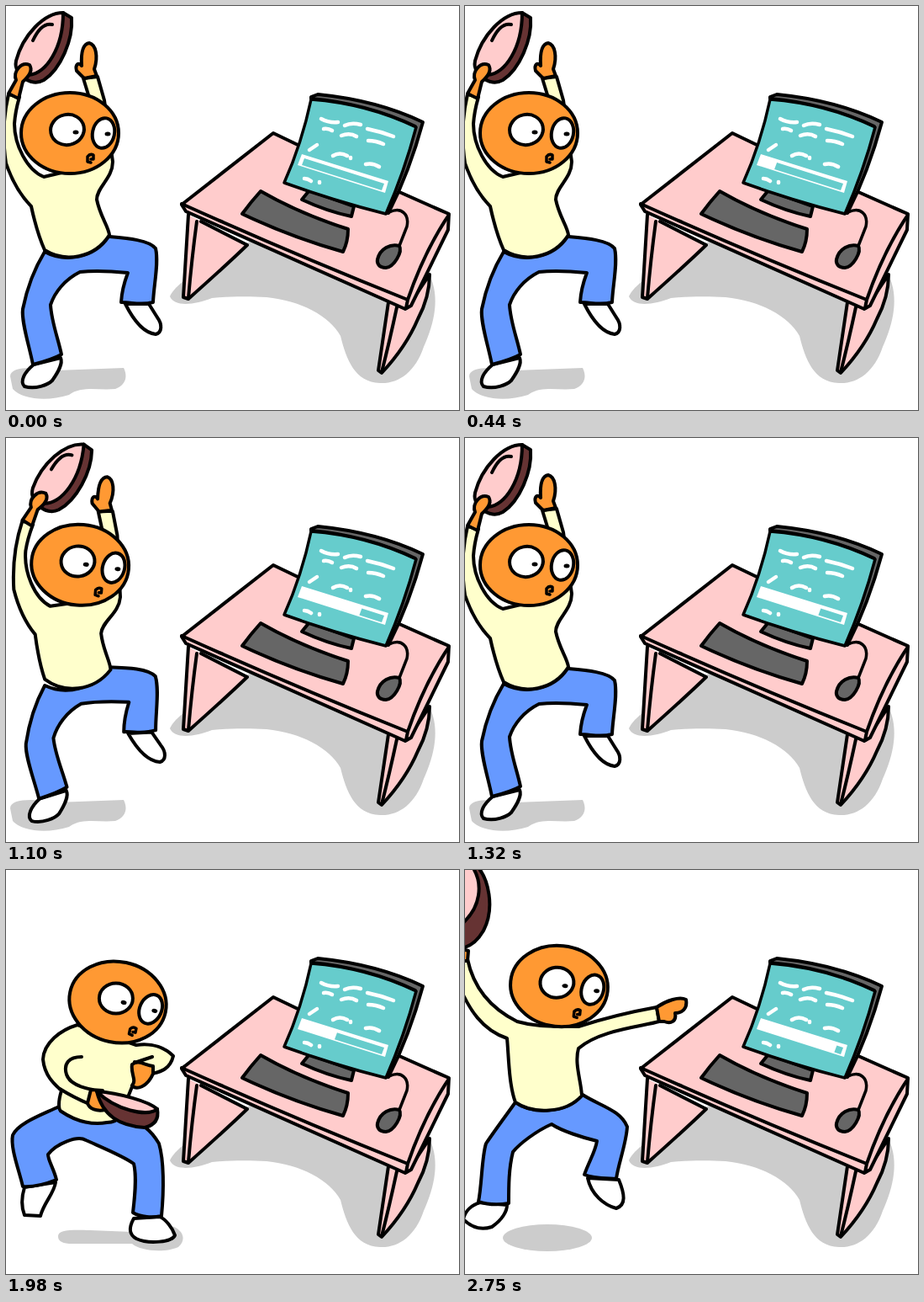
An HTML page that plays this animation: 539x480 px, repeating every 2860 ms.

```html
<!DOCTYPE html>
<html lang="en">
<head>
<meta charset="utf-8">
<title>Loading dance</title>
<style>
html, body { margin: 0; width: 100%; height: 100%; overflow: hidden; background: #fff }
svg { display: block; width: 100%; height: 100% }
svg { fill: none; stroke: #000; stroke-width: 4; stroke-linecap: round; stroke-linejoin: round }
.shade { fill: #ccc; stroke: none }
.pink { fill: #fcc }
.grey { fill: #666 }
.teal { fill: #6cc }
.skin { fill: #f93 }
.shirt { fill: #ffc }
.jeans { fill: #69f }
.white { fill: #fff }
.rim { fill: #633 }
.ink { fill: #000; stroke: none }
.text { stroke: #fff; stroke-width: 4.5 }
</style>
</head>
<body>
<svg viewBox="0 0 539 480">
  <defs>
    <g id="head">
      <ellipse class="skin" rx="58" ry="48"/>
      <ellipse class="white" cx="-3" cy="-4" rx="20" ry="18" transform="rotate(-12 -3 -4)"/>
      <ellipse class="white" cx="40" cy="0" rx="13" ry="18" transform="rotate(12 40 0)"/>
      <ellipse class="ink" cx="7" cy="-1" rx="3.5" ry="2.5"/>
      <ellipse class="ink" cx="45" cy="1" rx="3.5" ry="2.5"/>
      <path stroke-width="3.5" d="M25 35L21 34V28Q24 24 28 26V31H25"/>
    </g>
  </defs>

  <g id="desk">
    <path class="shade" d="M195 345C203 328 235 308 290 280L503 318C515 340 513 370 497 405C487 435 467 449 445 448C415 447 405 420 398 392C385 368 350 350 310 346C290 345 265 345 245 347C225 355 200 358 195 345Z"/>
    <path class="pink" d="M217 248L211 346L217 348Q262 308 287 284L232 256"/>
    <path d="M227 256Q221 300 217 347"/>
    <path class="pink" d="M455 352L443 433L447 436Q476 405 490 372Q504 346 504 319L482 352"/>
    <path d="M465 358Q456 400 447 435"/>
    <path class="pink" d="M318 151L209 236L214 244L475 360L482 356L526 266L527 247Q423 202 318 151Z"/>
    <path d="M209 235Q340 294 478 349Q498 291 527 248M478 349L476 359"/>
    <path class="grey" d="M303 220Q292 232 281 247Q340 275 401 292Q407 280 407 265Q350 247 303 220Z"/>
    <path class="grey" d="M361 219L352 230Q382 244 411 250L414 238Z"/>
    <path stroke-width="3.5" d="M456 245C471 238 480 248 477 262L468 285"/>
    <path class="grey" d="M442 301C445 288 458 282 468 285C472 292 462 310 452 311C444 311 441 306 442 301Z"/>
    <path class="grey" d="M363 108L371 105Q442 112 496 138Q480 197 455 246L451 246L487 143Q430 116 363 110Z"/>
    <path class="teal" stroke-width="3.5" d="M363 111Q352 163 331 210Q392 232 452 247Q474 197 488 144Q430 116 363 111Z"/>
    <path class="text" d="M375 134Q384 139 395 138M403 142Q411 138 422 141M430 146Q445 149 461 155M378 146Q383 145 388 148M399 154Q409 150 417 155M431 160Q440 160 449 164M361 171L370 165M389 178Q397 173 406 178M410 180V181M428 188Q436 186 444 191M355 205Q359 205 363 208M373 209V210"/>
    <path class="white" stroke="none" d="M352 176L455 208L451 222L347 189Z"/>
    <g transform="matrix(95 30 -3 8 355 181)"><rect id="hole" class="teal" stroke="none" height="1"/></g>
  </g>

  <g id="raise">
    <path class="shade" d="M5 440C5 429 30 428 60 433L140 430C145 440 143 450 130 455C110 457 90 451 75 462C50 470 20 468 8 455Z"/>
    <g class="legs">
      <path class="white" d="M33 426C22 435 16 446 22 452C35 456 50 450 55 445C62 435 68 425 65 418Z"/>
      <path class="white" d="M142 354C150 370 162 388 178 390C186 388 186 378 180 370L170 354Z"/>
      <path class="jeans" d="M46 292C70 305 105 300 122 274C145 276 170 278 178 288C182 305 176 330 175 352C160 356 150 352 137 352C138 335 142 325 145 317C125 315 105 314 88 316C70 325 58 340 53 355C54 375 62 395 66 414C55 420 40 424 32 426C28 405 18 375 20 360C25 335 35 310 46 292Z"/>
    </g>
    <g class="upper">
      <path class="shirt" d="M3 105C-3 130 -4 160 0 187C8 210 20 228 30 238Q37 270 46 290C70 305 105 300 123 272C122 262 112 250 108 230C108 215 127 205 127 185L117 112L109 84L92 86L100 112V190L45 203C25 195 10 165 10 140C11 125 14 115 16 108Z"/>
      <path class="rim" d="M68 8L78 14C80 40 65 75 45 88C38 92 28 92 20 84Z"/>
      <path class="pink" d="M68 8C45 8 20 35 12 65C10 75 15 83 27 82C48 80 68 50 68 8Z"/>
      <path d="M32 41C38 28 46 20 55 22"/>
      <path class="skin" d="M3 104L12 88C8 78 18 66 28 70C32 76 28 83 20 90L15 110Z"/>
      <path class="skin" d="M93 86L84 77C82 70 86 66 90 71C89 55 92 45 99 44C107 46 110 60 105 75L108 83Z"/>
      <use href="#head" x="76" y="151"/>
    </g>
  </g>

  <g id="crouch">
    <path class="shade" d="M62 435C62 428 75 427 100 428L150 430L200 424C212 430 214 440 205 448C190 455 160 453 150 444H75C65 443 62 440 62 435Z"/>
    <g class="legs">
      <path class="white" d="M22 377C18 390 18 400 22 410L41 411C45 395 57 385 59 371Z"/>
      <path class="white" d="M152 414C146 425 146 433 155 438C170 445 198 442 201 434C198 425 190 415 183 412Z"/>
      <path class="jeans" d="M63 281C45 290 15 300 8 315C5 330 15 355 20 376C35 377 50 372 60 368C57 355 50 345 50 338C60 325 85 315 95 321C115 330 140 340 152 349C156 365 153 390 151 407C160 413 175 413 185 411C188 380 188 345 182 325C172 308 160 300 150 300Z"/>
    </g>
    <g class="upper">
      <path class="shirt" d="M85 184C65 190 45 205 44 225C46 245 58 255 66 262C62 275 62 285 66 287C85 300 105 303 120 300C135 300 143 288 145 270L153 250V228L174 242C182 240 195 238 199 221C190 212 175 205 155 208Z"/>
      <path d="M90 222C75 222 68 230 72 243C76 255 92 259 103 261M64 260Q80 270 99 278M174 222L153 229"/>
      <path class="skin" d="M101 261L115 262L118 285C108 287 99 284 97 277Z"/>
      <path class="skin" d="M150 231C158 225 165 232 175 233V242C168 258 155 262 150 256C156 250 148 242 150 231Z"/>
      <path class="rim" d="M108 263L180 284C182 295 178 303 165 306C135 304 115 292 108 263Z"/>
      <path class="pink" d="M108 263C135 265 170 275 180 284C168 294 130 285 108 263Z"/>
      <use href="#head" transform="translate(133 157) rotate(12)"/>
    </g>
  </g>

  <g id="lunge">
    <ellipse class="shade" cx="98" cy="437" rx="53" ry="16"/>
    <path class="white" d="M18 395C8 398 0 405 -2 415C8 425 20 428 32 424C45 415 50 405 50 398Z"/>
    <path class="white" d="M146 366C150 385 165 398 180 402C192 398 190 385 183 368Z"/>
    <path class="jeans" d="M60 276C80 290 120 290 140 267C160 280 185 285 193 305C192 325 182 350 180 367C165 366 152 366 142 362C148 345 155 335 157 322C140 318 115 310 103 302C85 310 65 325 57 335C52 355 52 375 52 396C40 398 28 398 16 394C20 375 20 340 25 325C35 310 50 290 60 276Z"/>
    <path class="shirt" d="M-6 108L3 106C8 130 22 160 62 180C90 188 110 185 135 186C160 178 200 168 228 163L231 180C210 186 160 190 135 212C130 230 138 250 139 268C120 290 80 290 60 276C52 255 52 220 50 200C20 190 5 165 -6 140Z"/>
    <path class="rim" d="M14 -5C28 10 36 45 22 72C15 84 5 92 -6 93V-5Z"/>
    <path class="pink" d="M8 -5C22 15 20 45 -6 66V-5Z"/>
    <path class="skin" d="M-6 93L4 96L3 108H-6Z"/>
    <path class="skin" d="M228 163C240 155 255 150 263 154C265 165 258 170 250 170C252 180 245 183 237 180L231 180Z"/>
    <use href="#head" transform="translate(112 138) rotate(6)"/>
  </g>
</svg>
<script>
const LOOP = 2860, BEAT = 220;
const poses = ['raise', 'crouch', 'lunge'].map(id => document.getElementById(id));
const hole = document.getElementById('hole');
// Pivot of the sway, and which beats (odd or even) it falls on.
const dance = {
  raise: { hips: '85 290', beat: 1 },
  crouch: { hips: '100 290', beat: 0 },
};
const progress = [[0, 0], [440, .17], [990, .72], [1540, .41], [2090, .92]];

function poseAt(t) {
  if (t >= 2750 || (t >= 1430 && t < 1540)) return 'lunge';
  return t < 1430 ? 'raise' : 'crouch';
}

function sway(name, t) {
  const { hips, beat } = dance[name];
  const amount = Math.floor(t / BEAT) % 2 === beat ? 1 : 0;
  const turn = (part, angle) => document.querySelector(`#${name} .${part}`)
    .setAttribute('transform', `rotate(${angle * amount} ${hips})`);
  turn('upper', 5);
  turn('legs', -3);
}

function draw(now) {
  const t = now % LOOP;
  const name = poseAt(t);
  for (const pose of poses) pose.style.display = pose.id === name ? '' : 'none';
  if (dance[name]) sway(name, t);

  const done = progress.findLast(([start]) => t >= start)[1];
  hole.setAttribute('x', done);
  hole.setAttribute('width', 1 - done);
  requestAnimationFrame(draw);
}
draw(performance.now());
</script>
</body>
</html>
```
